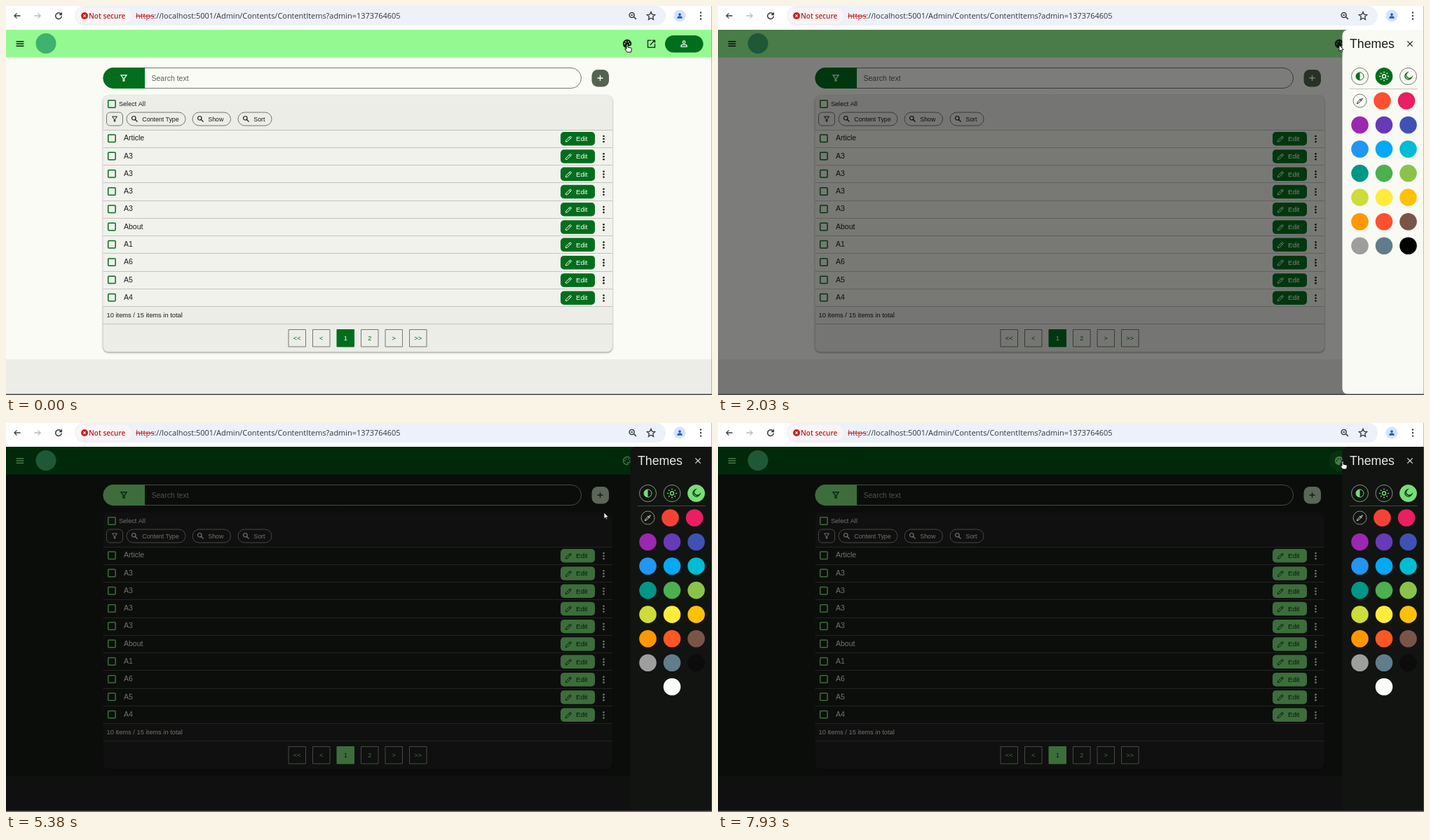
Animation, 1007 px wide and 556 px high, one loop 8000 ms. Source, as an HTML page with a canvas:

```html
<!DOCTYPE html>
<html lang="en">
<head>
<meta charset="utf-8">
<title>Admin theme picker</title>
<style>
html, body { margin: 0; width: 100%; height: 100%; overflow: hidden; }
canvas { display: block; }
</style>
</head>
<body>
<canvas id="stage" width="1007" height="556"></canvas>
<script>
const ctx = document.getElementById('stage').getContext('2d');
const LOOP = 8000;
const SANS = '"Liberation Sans", Arial, sans-serif';
const UI = '"Open Sans", "Noto Sans", sans-serif';

const LIGHT = {
  primary: '#006e1c', onPrimary: '#fff', header: '#94f990', icon: '#0b2010', page: '#fafbf5',
  head: '#ecede7', row: '#f1f2ec', text: '#1a1c19', hint: '#5c5f5a', line: '#c1c4bd',
  border: '#72796f', plus: '#52634f', drawer: '#f9faf4', hover: 'rgba(0,0,0,.1)', edge: '#444'
};
const DARK = {
  primary: '#78dc77', onPrimary: '#00390a', header: '#005313', icon: '#8df48b', page: '#171a17',
  head: '#1e211e', row: '#191c19', text: '#e8e9e3', hint: '#9ea39b', line: '#424940',
  border: '#8c9388', plus: '#baccb3', drawer: '#111411', hover: 'rgba(120,220,119,.12)', edge: '#777'
};
const SWATCHES = ('9c27b0 673ab7 3f51b5 2196f3 03a9f4 00bcd4 009688 4caf50 8bc34a ' +
  'cddc39 ffeb3b ffc107 ff9800 ff5722 795548 9e9e9e 607d8b 000000').split(' ');
const ROWS = ['Article', 'A3', 'A3', 'A3', 'A3', 'About', 'A1', 'A6', 'A5', 'A4'];

// Icons on a 24 unit grid
const ICON = {
  funnel: 'M5 5H19L13.5 12.5V19H10.5V12.5Z',
  search: 'M15 9.5A5.5 5.5 0 1 1 4 9.5A5.5 5.5 0 1 1 15 9.5M14 14L20 20',
  zoomOut: 'M16 10A6.5 6.5 0 1 1 3 10A6.5 6.5 0 1 1 16 10M14.5 14.5L21 21M6.5 10H12.5',
  pencil: 'M4 20V16.5L16.5 4L20 7.5L7.5 20ZM13.5 7L17 10.5',
  dropper: 'M4 20L5 16L13 8L16 11L8 19ZM11.5 6.5L17.5 12.5M15 8L18.5 4.5L20 6L16.5 9.5',
  launch: 'M12 4H4V20H20V12M14 4H20V10M20 4L9 15',
  person: 'M15 8A3 3 0 1 1 9 8A3 3 0 1 1 15 8M5 19V17C5 15 9 14 12 14S19 15 19 17V19Z',
  palette: 'M12 21A9 9 0 1 1 21 11A5 5 0 0 1 16 16H14C12 16 12.500 18 13.500 19C14 20 13.200 21 12 21Z',
  moon: 'M20 14.500A8 8 0 1 1 9.500 4A7 7 0 0 0 20 14.500Z',
  menu: 'M2 6H22M2 12H22M2 18H22',
  close: 'M4 4L20 20M20 4L4 20',
  plus: 'M12 4V20M4 12H20',
  back: 'M22 12H3M11 4L3 12L11 20',
  forward: 'M2 12H21M13 4L21 12L13 20',
  reload: 'M20 13A8 8 0 1 1 17 6L20 9M20 3V9H14',
  star: 'M12 3L14.700 9L21 9.700L16.300 14L17.600 20.500L12 17.200L6.400 20.500L7.700 14L3 9.700L9.300 9Z',
  sun: 'M16 12A4 4 0 1 1 8 12A4 4 0 1 1 16 12M12 1V4M12 20V23M1 12H4M20 12H23' +
    'M4.200 4.200L6.300 6.300M17.700 17.700L19.800 19.800M4.200 19.800L6.300 17.700M17.700 6.300L19.800 4.200'
};
const SHAPE = Object.fromEntries(Object.entries(ICON).map(([k, d]) => [k, new Path2D(d)]));
const ARROW = new Path2D('M0 0V10.500L2.500 8.200L4.200 11.800L5.800 11L4.200 7.600H7.400Z');
const HAND = new Path2D('M0 1Q1 -.5 2 1V5L6.500 6Q7.500 6.300 7.300 8L6.500 12H1L-2 8Q-2.500 6.500 -1 6.800L0 7.500Z');

// Time, drawer opening
const OPENING = [[0, 0], [250, .12], [370, .52], [510, .93], [640, 1], [6190, .8], [6330, .2],
  [6470, 0], [7660, .4], [7810, .93], [7930, 1]];
// Time, pointer tip, 1 for a hand
const POINTER = [[0, 885, 54, 1], [2030, 886, 56, 0], [2180, 889, 63, 0], [2300, 895, 76, 0],
  [2430, 902, 90, 0], [2580, 911, 102, 1], [2700, 914, 105, 1], [2850, 950, 108, 1],
  [3000, 966, 108, 0], [3140, 978, 104, 1], [3270, 985, 102, 1], [3420, 987, 102, 1],
  [4620, 975, 108, 1], [4740, 945, 108, 1], [4870, 915, 106, 1], [4990, 846, 134, 0],
  [5140, 851, 131, 0], [5260, 853, 129, 0], [5380, 853, 128, 0], [5500, 828, 134, 0],
  [5620, 814, 136, 0], [6050, 813, 138, 0], [6470, 847, 108, 0], [6620, 862, 78, 0],
  [6740, 878, 60, 1], [6870, 884, 56, 1], [6990, 890, 54, 1]];
const held = (keys, t) => keys.findLast(k => k[0] <= t);

function rect(x, y, w, h, fill, r = 0, stroke) {
  ctx.beginPath();
  ctx.roundRect(x, y, w, h, r);
  paint(fill, stroke);
}
function circle(x, y, r, fill, stroke) {
  ctx.beginPath();
  ctx.arc(x, y, r, 0, 7);
  paint(fill, stroke);
}
function paint(fill, stroke) {
  if (fill) { ctx.fillStyle = fill; ctx.fill(); }
  if (stroke) { ctx.strokeStyle = stroke; ctx.lineWidth = 1; ctx.stroke(); }
}
function icon(name, x, y, size, color, width = 2, filled) {
  ctx.save();
  ctx.translate(x - size / 2, y - size / 2);
  ctx.scale(size / 24, size / 24);
  ctx.strokeStyle = ctx.fillStyle = color;
  ctx.lineWidth = width;
  if (filled) ctx.fill(SHAPE[name]);
  ctx.stroke(SHAPE[name]);
  ctx.restore();
}
function text(s, x, y, size, color, font = SANS, weight = 400, align = 'left') {
  ctx.font = `${weight} ${size}px ${font}`;
  ctx.textAlign = align;
  ctx.fillStyle = color;
  ctx.fillText(s, x, y);
}
function dots(x, y, gap, r, color) {
  for (const k of [-1, 0, 1]) circle(x, y + k * gap, r, color);
}

function browserBar() {
  const ink = '#3c4043';
  rect(0, 0, 1007, 34, '#fff');
  rect(98, 0, 843, 28, '#edf1fa', 14);
  rect(99, 3, 80, 22, '#fcf3f4', 11);
  icon('back', 16, 14, 11, ink, 2.8);
  icon('forward', 45, 14, 11, '#bbb', 2.8);
  icon('reload', 75, 14, 13, ink, 2.8);
  circle(112, 14, 5, '#c5221f');
  icon('close', 112, 14, 5, '#fff', 5);
  text('Not secure', 118, 18, 10, '#b3261e', UI, 600);
  text('https', 185, 18, 10.95, '#c5221f', UI);
  const w = ctx.measureText('https').width;
  rect(185, 14, w, 1, '#c5221f');
  text('://localhost:5001/Admin/Contents/ContentItems?admin=1373764605', 185 + w, 18, 10.95, '#33363a', UI);
  icon('zoomOut', 894, 14, 13, ink, 2.8);
  icon('star', 920, 14, 15, ink, 2.2);
  circle(961, 14, 8.5, '#d3e3fd');
  icon('person', 961, 14, 11, '#1a56c4', 2, true);
  dots(991, 14, 4.5, 1.2, ink);
}

function header(c, t) {
  rect(0, 34, 1007, 39.500, c.header);
  icon('menu', 20, 54, 13, c.icon, 2.6);
  circle(57, 53.5, 14.5, '#3eb26f');
  if ((t >= 250 && t < 640) || t >= 7370) circle(886, 54, 14.5, c.hover);
  const filled = t < 2180 || t >= 6990;
  icon('palette', 886, 54, 15, c.icon, 2, filled);
  for (const [x, y] of [[-3.5, 0], [-1.7, -2.7], [1.7, -2.7], [3.5, 0]])
    circle(886 + x, 54 + y, .9, filled ? c.header : c.icon);
  icon('launch', 920.5, 54, 15, c.icon, 2);
  rect(940, 42, 54.5, 24.5, c.primary, 12.2);
  icon('person', 967, 54, 14, c.onPrimary);
}

function searchBar(c) {
  rect(139, 88.5, 681.5, 29, null, 14.5, c.border);
  rect(138.5, 88, 59.500, 30, c.primary, [15, 0, 0, 15]);
  icon('funnel', 168, 103, 14, c.onPrimary);
  text('Search text', 207.500, 106.5, 10.500, c.hint);
  rect(835.5, 91, 24.5, 24.5, c.plus, 8.5);
  icon('plus', 847.5, 103, 12, c === LIGHT ? '#fff' : '#253423', 2.6);
}

function checkbox(c, y) {
  ctx.lineWidth = 1.5;
  ctx.strokeStyle = c.primary;
  ctx.beginPath();
  ctx.roundRect(145.7, y - 5.2, 10.4, 10.4, 1);
  ctx.stroke();
}

function table(c) {
  ctx.save();
  ctx.shadowColor = 'rgba(0,0,0,.45)';
  ctx.shadowBlur = 2.5;
  ctx.shadowOffsetY = 1;
  rect(138.5, 127.5, 726.5, 367, c.head, 8);
  ctx.restore();

  checkbox(c, 140);
  text('Select All', 161, 143.3, 9.1, c.text);
  rect(143.5, 152, 23, 19, null, 5, c.border);
  icon('funnel', 155, 161.5, 12, c.text);
  for (const [label, x, w] of [['Content Type', 172, 84], ['Show', 266, 54.5], ['Sort', 331, 48]]) {
    rect(x, 152, w, 19, null, 9.5, c.border);
    icon('search', x + 11.5, 161.5, 12, c.text, 2.4);
    text(label, x + 22.3, 164.6, 8.8, c.text);
  }

  const pitch = 25.27;
  rect(138.5, 177, 726.5, 10 * pitch, c.row);
  ROWS.forEach((name, i) => {
    const y = 189 + i * pitch;
    rect(138.5, Math.round(y - 12.5), 726.5, 1, c.line);
    checkbox(c, y + .2);
    text(name, 168, y + 3.4, 10.5, c.text);
    rect(791, y - 9, 49, 19.5, c.primary, 5);
    icon('pencil', 802.5, y + 1, 12, c.onPrimary);
    text('Edit', 813, y + 4, 9.6, c.onPrimary);
    dots(852.5, y + 1, 4, 1.3, c.text);
  });
  rect(138.5, 429, 726.5, 1, c.line);
  rect(138.5, 454, 726.5, 1, c.line);
  text('10 items / 15 items in total', 143.5, 444.8, 9.34, c.text);

  ['<<', '<', '1', '2', '>', '>>'].forEach((label, i) => {
    const x = 403 + i * 34.5, current = label === '1';
    rect(x, 462.5, 24.5, 24.5, current ? c.primary : null, 0, current ? c.primary : c.border);
    text(label, x + 12.2, 478, 9.2, current ? c.onPrimary : c.primary, SANS, 400, 'center');
  });
}

function drawer(c, open, tip) {
  const shift = 116 * (1 - open), dark = c === DARK;
  ctx.save();
  ctx.translate(shift, 0);
  rect(890.5, 34, 130, 521, c.drawer, 8);
  text('Themes', 901, 60, 17.7, c.text);
  icon('close', 987, 54, 11, c.text, 2.6);

  [915.5, 950, 984.5].forEach((x, i) => {
    const chosen = i === (dark ? 2 : 1), ink = chosen ? c.onPrimary : c.primary;
    circle(x, 100.5, 12, chosen ? c.primary : null, chosen ? c.primary : c.border);
    if (open === 1 && Math.hypot(tip[1] - x, tip[2] - 100.5) < 12) circle(x, 100.5, 12, c.hover);
    if (i) icon(i === 1 ? 'sun' : 'moon', x, 100.5, 15, ink, 2.2);
    else {
      circle(x, 100.5, 5.5, null, ink);
      ctx.beginPath();
      ctx.arc(x, 100.5, 5.5, Math.PI / 2, -Math.PI / 2);
      paint(ink);
    }
  });
  rect(901, 118, 97, 1, c.line);

  circle(915.5, 135.5, 9.5, null, c.border);
  icon('dropper', 915.5, 135.5, 12, c.text, 2);
  circle(947.5, 135.5, 12.3, dark ? '#f44336' : '#ff5030');
  circle(982, 135.5, 12.3, '#e91e63');
  SWATCHES.forEach((hex, i) => {
    const fill = hex === '000000' && dark ? '#0b0c0b' : hex === 'ff5722' && !dark ? '#ff5030' : '#' + hex;
    circle(915.5 + i % 3 * 34.5, 170 + Math.floor(i / 3) * 34.55, 12.3, fill);
  });
  if (dark) circle(950, 377, 12.3, '#fff');
  ctx.restore();
}

function pointer([, x, y, hand]) {
  ctx.save();
  ctx.translate(x, y);
  ctx.lineJoin = 'round';
  ctx.lineWidth = 1;
  ctx.fillStyle = '#fff';
  ctx.strokeStyle = '#111';
  if (!hand) ctx.scale(.85, .85);
  const shape = hand ? HAND : ARROW;
  ctx.fill(shape);
  ctx.stroke(shape);
  ctx.restore();
}

function draw(t) {
  const c = t < 3950 ? LIGHT : DARK;
  const open = held(OPENING, t)[1];
  const tip = held(POINTER, t);
  rect(0, 0, 1007, 556, c.page);
  rect(0, 505, 1007, 51, c.head);
  header(c, t);
  searchBar(c);
  table(c);
  if (open) {
    rect(0, 34, 1007, 522, `rgba(0,0,0,${open / 2})`);
    drawer(c, open, tip);
  }
  browserBar();
  rect(0, 554.5, 1007, 1.5, c.edge);
  rect(1006, 0, 1, 556, 'rgba(128,128,128,.5)');
  pointer(tip);
}

const start = performance.now();
function tick() {
  draw((performance.now() - start) % LOOP);
  requestAnimationFrame(tick);
}
tick();
</script>
</body>
</html>
```
